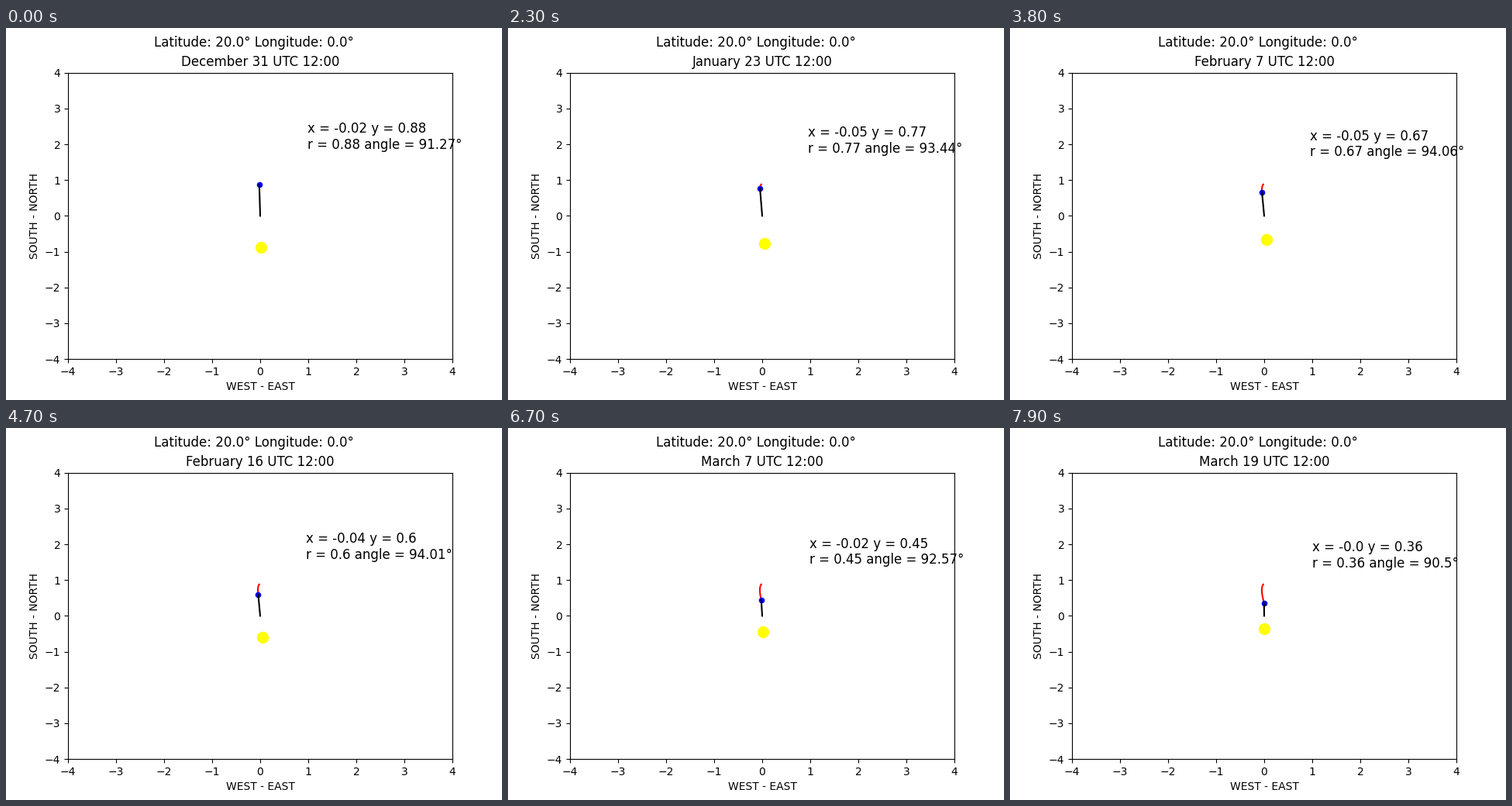
Write a matplotlib script that moves like this. It is 640 by 480 pixels and loops after 8000 ms.

```python
import numpy as np
import matplotlib.pyplot as plt
from matplotlib.animation import FuncAnimation

DAYS = 80
LATITUDE, LONGITUDE = 20.0, 0.0
TILT = np.radians(23.44)
YEAR = 365.25
EQUINOX = 80.17
STICK = 0.942
MONTHS = [("December", 1), ("January", 31), ("February", 29), ("March", 31)]


def calendar(day):
    """Month name and day of month, counted from December 31."""
    if day == 0:
        return "December", 31
    day -= 1
    for name, length in MONTHS[1:]:
        if day < length:
            return name, day + 1
        day -= length


def day_of_year(day):
    # Leap day and March 1 share a number.
    if day == 0:
        return 365
    return day if day < 60 else day - 1


def shadow(day):
    """Tip of the noon shadow for a circular orbit."""
    lam = 2 * np.pi * (day_of_year(day) - EQUINOX) / YEAR
    lat = np.radians(LATITUDE)
    dec = np.arcsin(np.sin(TILT) * np.sin(lam))
    ascension = np.arctan2(np.cos(TILT) * np.sin(lam), np.cos(lam))
    hour = np.angle(np.exp(1j * (lam - ascension)))
    east = np.cos(dec) * np.sin(hour)
    north = np.cos(lat) * np.sin(dec) - np.sin(lat) * np.cos(dec) * np.cos(hour)
    up = np.sin(lat) * np.sin(dec) + np.cos(lat) * np.cos(dec) * np.cos(hour)
    # Before the equinox the sun still stands east of the meridian.
    return -STICK * abs(east) / up, -STICK * north / up


path = np.array([shadow(day) for day in range(DAYS)])

fig, ax = plt.subplots(figsize=(6.4, 4.8), dpi=100)
fig.suptitle(f"Latitude: {LATITUDE}° Longitude: {LONGITUDE}°")
ax.set(xlim=(-4, 4), ylim=(-4, 4), xlabel="WEST - EAST", ylabel="SOUTH - NORTH")
title = ax.set_title("")
trail, = ax.plot([], [], color="red", zorder=0.9)
tip = ax.scatter([0], [0], s=20, color="blue")
sun = ax.scatter([0], [0], s=100, color="yellow")
stick, = ax.plot([], [], color="black")
label = ax.text(0, 0, "", fontsize=12)


def draw(day):
    x, y = path[day]
    r = np.hypot(x, y)
    angle = np.degrees(np.arctan2(y, x))
    month, date = calendar(day)
    title.set_text(f"{month} {date} UTC 12:00")
    trail.set_data(path[:day + 1, 0], path[:day + 1, 1])
    stick.set_data([0, x], [0, y])
    tip.set_offsets([[x, y]])
    sun.set_offsets([[-x, -y]])
    label.set_position((x + 1, y + 1))
    label.set_text(
        f"x = {round(float(x), 2)} y = {round(float(y), 2)}\n"
        f"r = {round(float(r), 2)} angle = {round(float(angle), 2)}°"
    )
    return title, trail, stick, tip, sun, label


anim = FuncAnimation(fig, draw, frames=DAYS, interval=100,
                     init_func=lambda: draw(0), repeat=True, repeat_delay=0)
plt.show()
```
